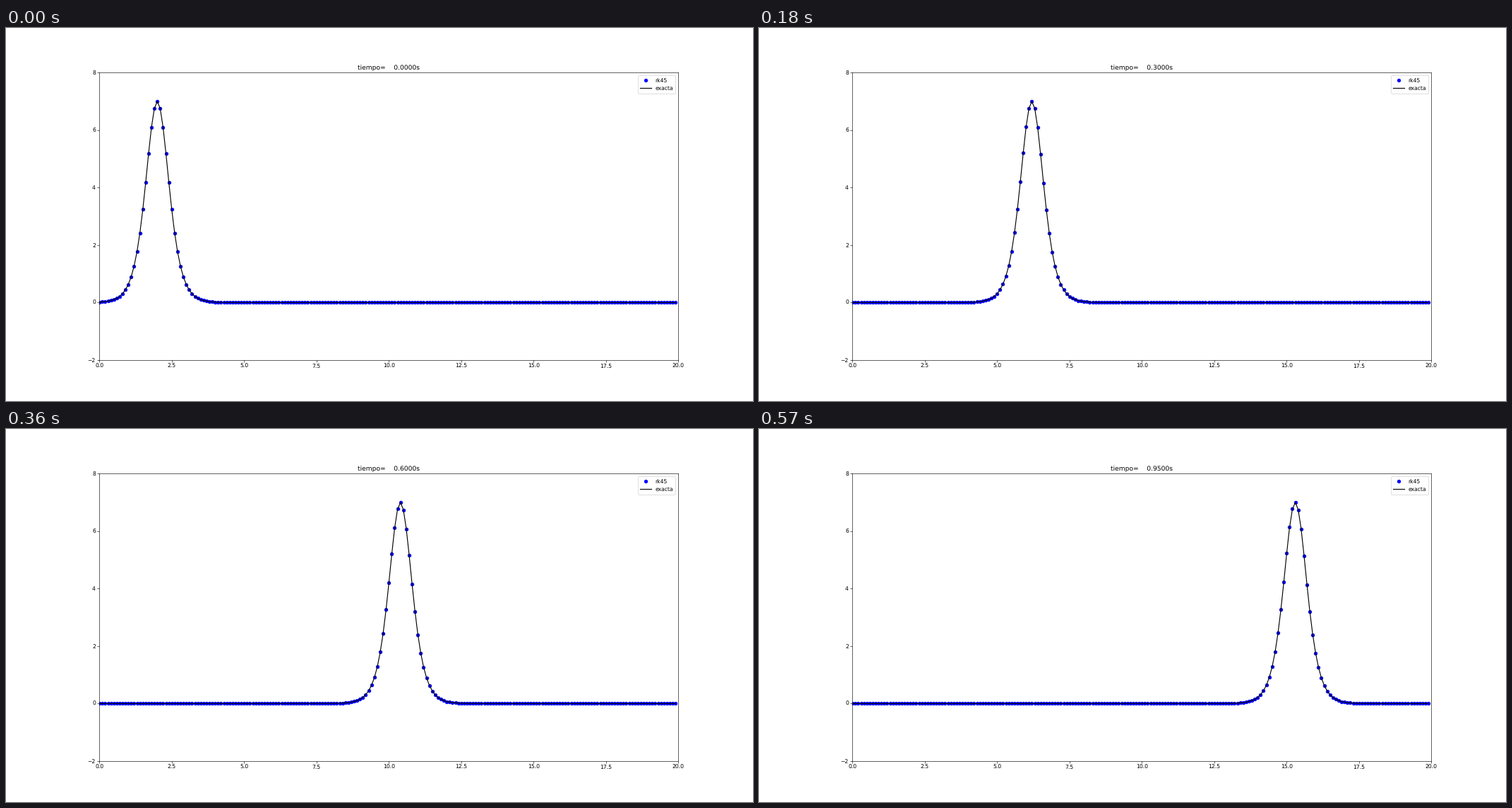
A matplotlib script for the animation above (600 ms loop, 1058 px wide and 529 px high).

```python
import numpy as np
import matplotlib.pyplot as plt
from matplotlib.animation import FuncAnimation

FRAMES, STEP_MS = 20, 30
DT = 0.05            # simulated seconds per frame
SPEED = 14.0         # soliton speed, its height is half of it
START = 2.0
LAG = 0.0055         # numerical drift per simulated second

plt.rcParams.update({
    "font.family": "DejaVu Sans",
    "text.hinting": "none",
})


def soliton(x, t, speed=SPEED):
    phase = np.sqrt(SPEED) / 2 * (x - START - speed * t)
    return SPEED / 2 / np.cosh(phase) ** 2


fig, ax = plt.subplots(figsize=(19.2, 9.6), dpi=55.1042)
x = np.arange(200) * 0.1

dots, = ax.plot(x, soliton(x, 0), "bo", label="rk45")
line, = ax.plot(x, soliton(x, 0), "k-", label="exacta")
ax.set_xlim(0, 20)
ax.set_ylim(-2, 8)
ax.legend(loc="upper right")
title = ax.set_title("")


def draw(i):
    t = i * DT
    dots.set_ydata(soliton(x, t, SPEED - LAG))
    line.set_ydata(soliton(x, t))
    title.set_text(f"tiempo={t:10.4f}s")
    return dots, line, title


def reset():
    return draw(0)


anim = FuncAnimation(fig, draw, frames=FRAMES, init_func=reset,
                     interval=STEP_MS, repeat=True, repeat_delay=0, blit=False)
plt.show()
```
